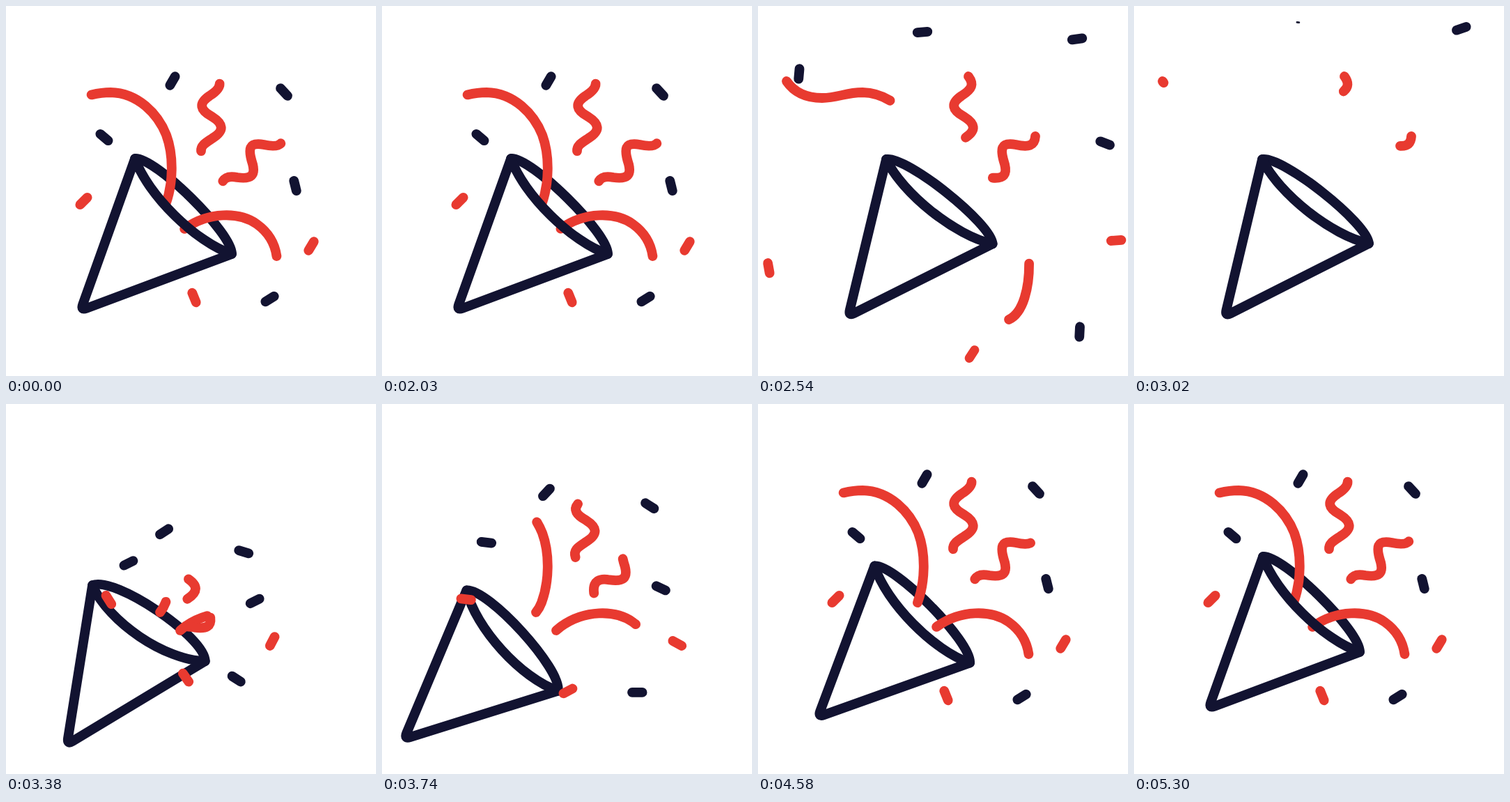
Recreate the animation shown at these times as an HTML page. Size 531 px wide and 531 px high, loop 5.36 s.

```html
<!DOCTYPE html>
<html lang="en">
<head>
<meta charset="utf-8">
<title>Party popper</title>
<style>
  html, body { margin: 0; width: 100%; height: 100%; overflow: hidden; background: #fff; }
  svg { display: block; width: 100%; height: 100%; }
  path { fill: none; stroke-width: 13.8; stroke-linecap: round; stroke-linejoin: round; }
  .ink { stroke: #121331; }
  .red { stroke: #e83a30; }
</style>
</head>
<body>
<svg id="stage" viewBox="0 0 531 531"></svg>
<script>
const LOOP = 5360, START = 2030, BURST = 3110, SETTLE = 4600;
const stage = document.getElementById('stage');

const mix = (a, b, p) => a + (b - a) * p;
const clamp = p => Math.max(0, Math.min(1, p));
const smooth = p => p * p * (3 - 2 * p);
const easeOut = p => p * (2 - p);
const settle = p => smooth(1 - (1 - p) ** 1.35);

function addPath(cls, d = '') {
  const el = document.createElementNS('http://www.w3.org/2000/svg', 'path');
  el.setAttribute('class', cls);
  el.setAttribute('d', d);
  stage.appendChild(el);
  return el;
}

// The cone is rigid: mouth centre, tilt and how far the rim opens.
const REST = { x: 254.5, y: 287.5, tilt: 44.6, open: 22 };
const AIM = { x: 260.5, y: 280.5, tilt: 38.3, open: 22 };
const KICK = { x: 205, y: 314.5, tilt: 33.9, open: 29 };
const RECOIL = { x: 187, y: 339.5, tilt: 47.7, open: 25 };
const MOVES = [
  [START, 2600, REST, AIM, smooth],
  [BURST, 3380, AIM, KICK, smooth],
  [3380, 3740, KICK, RECOIL, easeOut],
  [3740, 5290, RECOIL, REST, settle]
];
const HALF = 97.5, HEIGHT = 210;

// A ribbon is a window sliding along its curve.
// from/to: ends at rest; grown: head position at the kick; pace: growth power;
// slide, shift: how far the window and curve are displaced at the kick;
// leave: duration and power of the tail running out.
const RIBBONS = [
  {
    d: 'M221 299Q226 293 229 285C240 255 241 215 230 185C218 155 190 125 150 124C125 124 115 132 92 132C68 132 52 124 41 108',
    from: [229, 285], to: [123, 128], grown: 17, pace: 2, slide: 0, shift: [0, 0], leave: [1000, 1]
  },
  {
    d: 'M250 325L256 320C290 295 335 295 360 313C378 326 388 345 389 365C390 400 382 440 360 450',
    from: [256, 320], to: [388, 359], grown: 44, pace: 2.7, slide: 0, shift: [0, 0], leave: [770, 1]
  },
  {
    d: 'M282 215C276 202 284 198 296 190C314 179 312 169 296 159C278 149 276 140 292 129C308 119 310 112 302 101',
    from: [284, 208], to: [306, 112], grown: 71, pace: 2, slide: 34, shift: [-37, 91], leave: [1080, 2.2]
  },
  {
    d: 'M310 268C306 247 318 243 332 246C352 249 358 243 354 227C347 205 348 195 370 199C388 203 397 201 398 187',
    from: [311, 251], to: [394, 197], grown: 73, pace: 0.7, slide: 32, shift: [-62, 75], leave: [1080, 2.2]
  }
];

// colour, rest [x, y, angle], drift [x, y], offset at the kick [x, y, angle]
const CONFETTI = [
  ['ink', [399, 123.5, 47], [59, -76], [-58, 89, -30]],
  ['ink', [239, 107.5, -60], [-3, -70], [-12, 76, 27]],
  ['ink', [415, 258, 76], [83, -61], [-58, 25, -103]],
  ['ink', [141, 188.5, 40], [-82, -91], [35, 40, -67]],
  ['red', [111.5, 280, -45], [-96, 96], [36, 1, 103]],
  ['red', [438, 344.5, -59], [76, -8], [-56, -4, 177]],
  ['ink', [378.5, 420.5, -32], [83, 47], [-48, -26, 65]],
  ['red', [270, 418.5, 68], [37, 81], [-12, -26, -193]]
];

// Length along a path at which it passes closest to a point.
function lengthAt(el, [x, y]) {
  let best = 0, min = Infinity;
  for (let s = 0, total = el.getTotalLength(); s <= total; s += 0.5) {
    const p = el.getPointAtLength(s), d = Math.hypot(p.x - x, p.y - y);
    if (d < min) { min = d; best = s; }
  }
  return best;
}

const back = addPath('ink');
const ribbons = RIBBONS.map(r => {
  const el = addPath('red', r.d);
  return { ...r, el, tail: lengthAt(el, r.from), head: lengthAt(el, r.to), end: el.getTotalLength() };
});
const front = addPath('ink');
const confetti = CONFETTI.map(([cls, rest, drift, kick]) =>
  ({ el: addPath(cls, 'M-7.3 0H7.3'), rest, drift, kick }));

function conePose(t) {
  const move = MOVES.filter(m => t >= m[0]).pop();
  if (!move) return REST;
  const [t0, t1, a, b, ease] = move, p = ease(clamp((t - t0) / (t1 - t0)));
  return Object.fromEntries(Object.keys(a).map(k => [k, mix(a[k], b[k], p)]));
}

function drawCone(t) {
  const { x, y, tilt, open } = conePose(t);
  const rim = (c, h) => `M${-HALF} 0C${-c} ${h} ${c} ${h} ${HALF} 0`;
  const ex = 3.8, ey = HEIGHT - 8.2;
  back.setAttribute('d', rim(HALF * 0.8, -open));
  front.setAttribute('d',
    `${rim(HALF * 0.5, open + 2)}L${ex} ${ey}Q0 ${HEIGHT} ${-ex} ${ey}Z`);
  for (const el of [back, front])
    el.setAttribute('transform', `translate(${x} ${y}) rotate(${tilt})`);
}

// Share of the flight still to go: 1 at the kick, 0 once settled.
const remaining = t => t < BURST ? 0 : Math.max(0, SETTLE - t) / 1220;

function drawRibbon(r, t) {
  let { tail, head } = r, dx = 0, dy = 0;
  if (t >= BURST) {
    const left = remaining(t), far = left ** 7;
    tail = tail * Math.max(0, 1 - 3 * left * left) + r.slide * far;
    head -= (head - r.grown) * left ** r.pace;
    [dx, dy] = r.shift.map(v => v * far);
  } else if (t > START) {
    const [time, power] = r.leave;
    tail = mix(tail, r.end, clamp((t - START) / time) ** power);
    head = mix(head, r.end, smooth(clamp((t - START) / 510)));
  }
  const len = head - tail;
  r.el.style.display = len < 1 ? 'none' : '';
  r.el.setAttribute('stroke-dasharray', `${len} 2000`);
  r.el.setAttribute('stroke-dashoffset', -tail);
  r.el.setAttribute('transform', `translate(${dx} ${dy})`);
}

function drawPiece({ el, rest, drift, kick }, i, t) {
  let [x, y, angle] = rest, size = 1;
  if (t >= BURST) {
    const left = remaining(t), far = left ** 3.9;
    x += kick[0] * far;
    y += kick[1] * far;
    angle += kick[2] * left * left;
  } else if (t > START) {
    const p = 0.6 * (1 - Math.cos(Math.PI * clamp((t - START) / 697)));
    x += drift[0] * p;
    y += drift[1] * p;
    angle += (i % 2 ? 55 : -55) * p;
    if (i) size = clamp((BURST - 65 * i - t) / 120);
  }
  el.style.display = size ? '' : 'none';
  el.setAttribute('transform', `translate(${x} ${y}) rotate(${angle}) scale(${size})`);
}

function draw(t) {
  drawCone(t);
  ribbons.forEach(r => drawRibbon(r, t));
  confetti.forEach((c, i) => drawPiece(c, i, t));
}

const begin = performance.now();
function tick() {
  draw((performance.now() - begin) % LOOP);
  requestAnimationFrame(tick);
}
tick();
</script>
</body>
</html>
```
